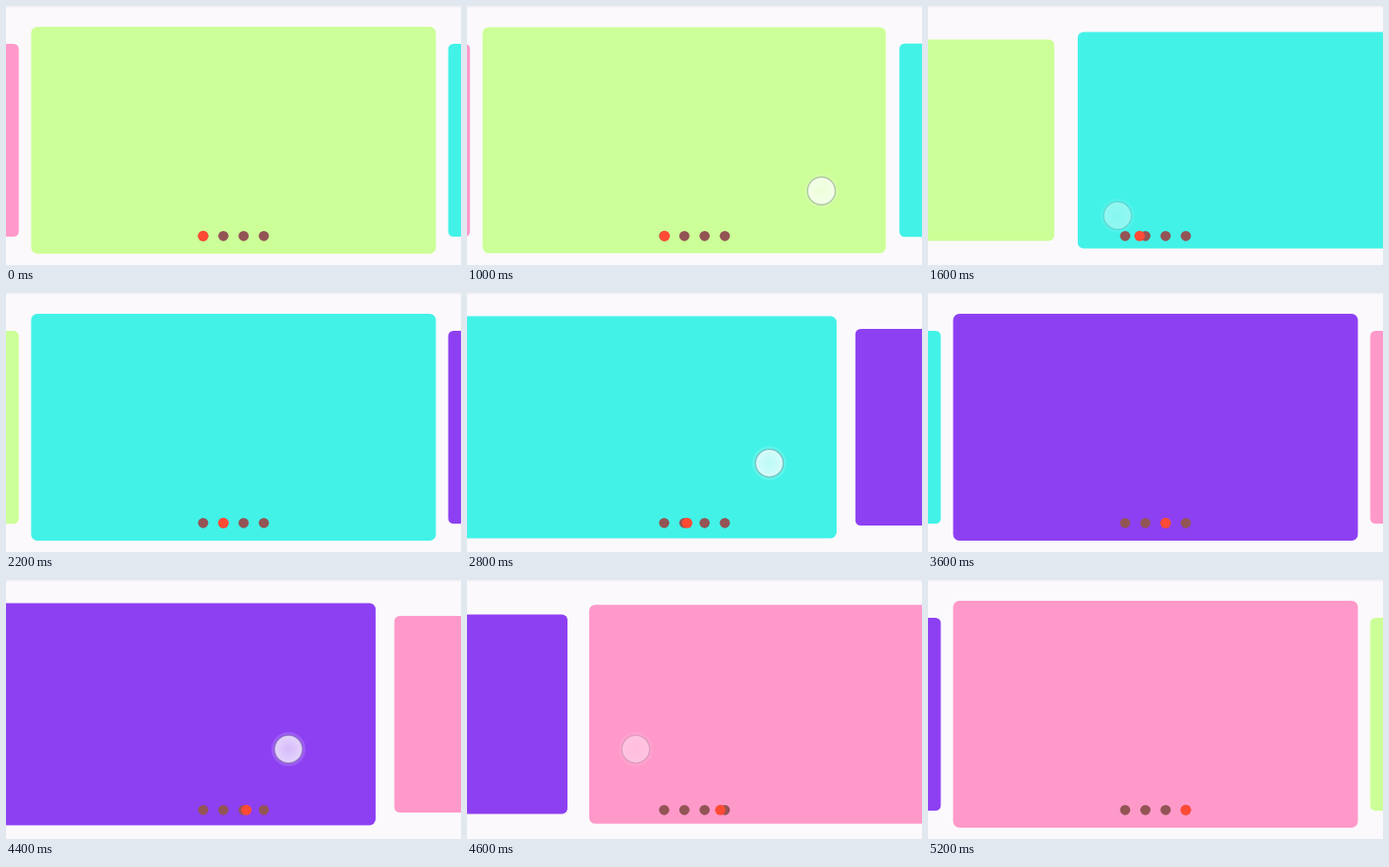
Write an HTML page that moves like this. It is 480 px wide and 274 px high and loops after 5.6 s.

```html
<!DOCTYPE html>
<html lang="en">
<head>
<meta charset="utf-8">
<title>Card carousel</title>
<style>
  html, body { margin: 0; width: 100%; height: 100%; overflow: hidden; background: #fbf9fc; }
  svg { display: block; width: 100%; height: 100%; }
</style>
</head>
<body>
<svg viewBox="0 0 480 274">
  <defs>
    <radialGradient id="glow">
      <stop offset="0" stop-color="#fff" stop-opacity=".58"/>
      <stop offset="1" stop-color="#fff" stop-opacity=".74"/>
    </radialGradient>
  </defs>
  <rect width="480" height="274" fill="#fbf9fc"/>
  <rect width="480" height="1.5" fill="#f3f1f5"/>
  <g id="cards"></g>
  <g id="dots"></g>
  <g id="touch">
    <circle r="18" fill="#fff" fill-opacity=".14"/>
    <circle r="14.6" fill="url(#glow)" stroke="#66707a" stroke-opacity=".4" stroke-width="1.4"/>
  </g>
</svg>
<script>
const LOOP = 5600, STEP = 200;
const COLORS = ['#ccff97', '#42f2e7', '#8d40f2', '#ff99ca'];
const STAGE_W = 480, CX = 240, CY = 142;
const CARD_W = 427, CARD_H = 240, SHRINK = .15, PITCH = STAGE_W * (1 - SHRINK);
const DOT_X = 208, DOT_GAP = 21.33, DOT_Y = 243.3;
const REACH = 85, SLOP = 19;          // finger travel before the fling, dead zone
const FLICK = 120, FLICK_TIME = 200;  // finger travel while it lifts off

// Each swipe drags from `start` to `fling`, then the page settles
const SWIPES = [
  { start: 600, fling: 1400, settle: 650, x: 405, y: 191, tilt: .15 },
  { start: 2600, fling: 2800, settle: 650, x: 404, y: 180, tilt: 0 },
  { start: 4050, fling: 4400, settle: 550, x: 383, y: 179, tilt: 0 }
];

const el = id => document.getElementById(id);
const clamp = v => Math.min(1, Math.max(0, v));

function set(node, attrs) {
  for (const key in attrs) node.setAttribute(key, attrs[key]);
}

function add(parent, tag, attrs) {
  const node = document.createElementNS('http://www.w3.org/2000/svg', tag);
  set(node, attrs);
  return parent.appendChild(node);
}

const cards = COLORS.map(fill => add(el('cards'), 'rect', { fill }));
COLORS.forEach((_, i) =>
  add(el('dots'), 'circle', { cx: DOT_X + i * DOT_GAP, cy: DOT_Y, r: 5.4, fill: '#935455' }));
const marker = add(el('dots'), 'circle', { cy: DOT_Y, r: 5.5, fill: '#ff4b35' });

function dragged(s, t) {
  return REACH * clamp((t - s.start) / (s.fling - s.start)) ** 1.45;
}

// Share of one page that a swipe has moved
function progress(s, t) {
  const drag = Math.max(0, dragged(s, t) - SLOP) / STAGE_W;
  const left = 1 - clamp((t - s.fling) / s.settle);
  return 1 - (1 - drag) * left ** 3;
}

function placeCard(card, i, page) {
  const d = (i - page + 6) % 4 - 2;
  const m = Math.min(1, Math.abs(d));
  const bow = m * (1 - m);
  const scale = 1 - SHRINK * m - .034 * m * bow;
  const x = CX + PITCH * d + Math.sign(d) * 25 * bow;
  const w = CARD_W * scale, h = CARD_H * scale;
  set(card, { x: x - w / 2, y: CY - h / 2, width: w, height: h, rx: 6.5 * scale });
}

function placeTouch(t) {
  const s = SWIPES.find(s => t >= s.start && t <= s.fling + FLICK_TIME);
  if (!s) return set(el('touch'), { visibility: 'hidden' });
  const lift = clamp((t - s.fling) / FLICK_TIME);
  const moved = dragged(s, t) + FLICK * lift;
  set(el('touch'), {
    visibility: 'visible',
    transform: `translate(${s.x - moved} ${s.y + s.tilt * moved})`,
    opacity: 1 - .45 * lift
  });
}

function draw(time) {
  // The carousel advances in discrete steps
  const t = Math.floor(time % LOOP / STEP) * STEP;
  const page = SWIPES.reduce((sum, s) => sum + progress(s, t), 0);
  cards.forEach((card, i) => placeCard(card, i, page));
  set(marker, { cx: DOT_X + page * DOT_GAP });
  placeTouch(t);
}

const start = performance.now();
function tick() {
  draw(performance.now() - start);
  requestAnimationFrame(tick);
}
tick();
</script>
</body>
</html>
```
